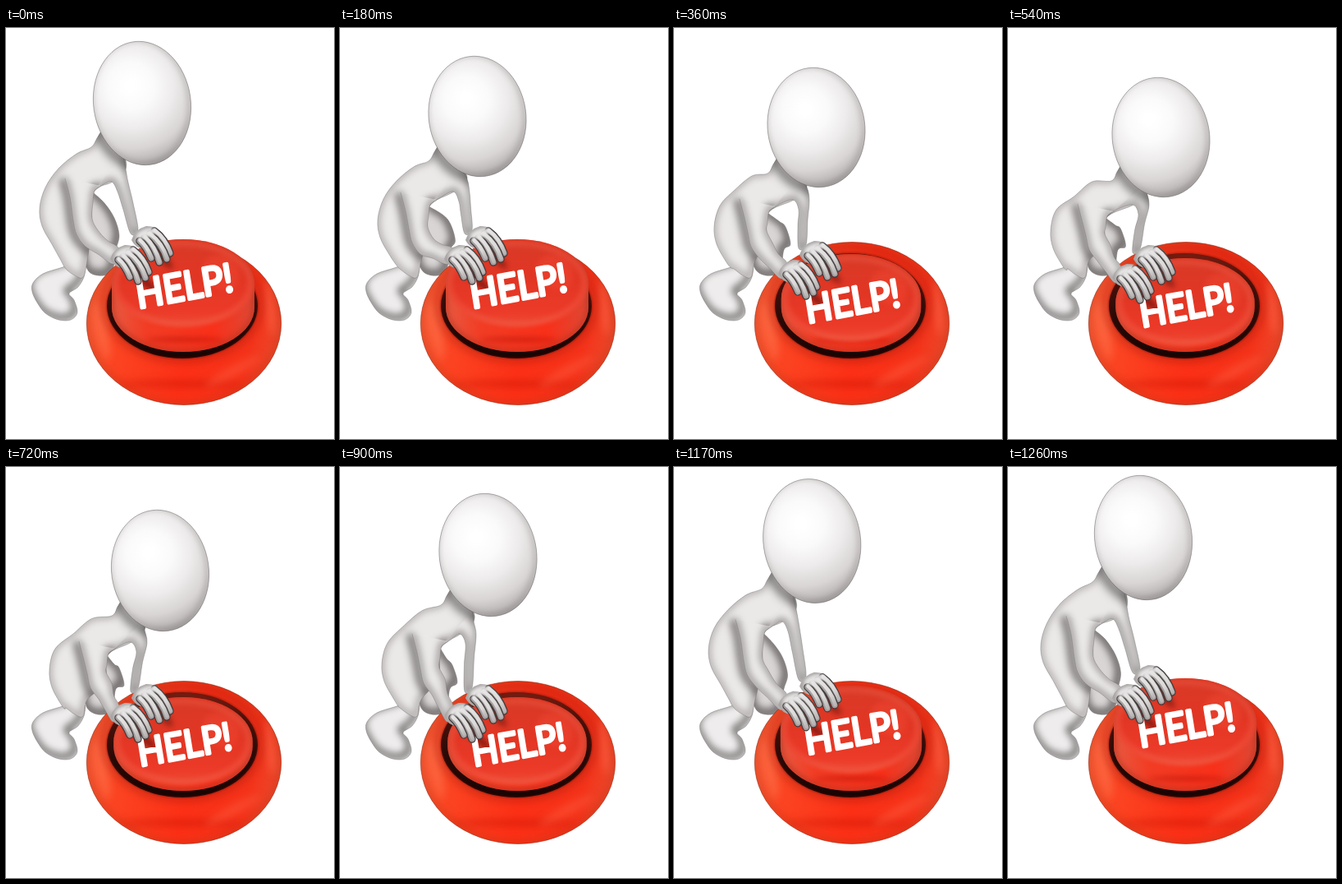
An HTML page with a canvas for the animation above (1410 ms loop, 400 by 500 pixels).

```html
<!DOCTYPE html>
<html lang="en">
<head>
<meta charset="utf-8">
<title>Help button</title>
<style>
  html, body { margin: 0; width: 100%; height: 100%; overflow: hidden; background: #fff; }
  canvas { display: block; width: 400px; height: 500px; }
</style>
</head>
<body>
<canvas id="stage" width="400" height="500"></canvas>
<script>
const ctx = document.getElementById('stage').getContext('2d');
const LOOP = 1410, STEP = 90, LAST = 14;

// One pose per 180 ms: head x, y, radius; offsets of neck, hip, armpit, far elbow; press depth
const POSES = [
  [166, 91.5, 75.5, 0, 0, 0, 0, 0, 0, 0, 0, 0],
  [167.5, 107.5, 73.5, 4, 17, 5, 14, 2, 17, 9, 12, 0],
  [173.5, 121, 73, 10, 32, 8, 22, 8, 25, 16, 22, 18],
  [186.5, 133, 73, 22, 41, 11, 27, 13, 31, 23, 28, 23],
  [188, 126, 74, 25, 36, 12, 27, 17, 29, 23, 26, 23],
  [180.5, 107, 75, 19, 23, 10, 20, 16, 20, 17, 16, 23],
  [172.5, 95.5, 75.5, 8, 13, 4, 8, 8, 8, 8, 5, 18],
  [165, 86, 76, -1, -5, -1, -3, -1, -2, -1, -2, 0]
];

// Outline points: x, y, joint that carries the point
const FAR_LEG = [[106, 200, 'a'], [120, 213, 'h'], [132, 231, 'l'], [138, 252, 'l'], [134, 270, 'o'],
  [129, 296, 'o'], [112, 301, 'o'], [98, 291, 'o'], [92, 250, 'l']];
const SHIN = [[82, 287, 'o'], [66, 292, 'o'], [45, 299, 'o'], [33, 310, 'o'], [32, 321, 'o'], [38, 334, 'o'],
  [48, 347, 'o'], [64, 355, 'o'], [79, 355, 'o'], [87, 346, 'o'], [83, 331, 'o'], [77, 323, 'o'],
  [88, 315, 'o'], [95, 303, 'o'], [97, 290, 'o']];
const TORSO = [[118, 122, 'n'], [111, 134, 'n'], [104, 145, 'n'], [86, 153, 's'], [64, 171, 's'], [48, 194, 'h'],
  [41, 219, 'h'], [44, 241, 'h'], [56, 263, 'h'], [66, 281, 'l'], [73, 293, 'o'], [84, 301, 'o'],
  [94, 303, 'o'], [99, 283, 'o'], [104, 245, 'e'], [107, 200, 'a'], [130, 187, 'b'], [146, 172, 'b'],
  [142, 148, 'n'], [126, 118, 'n']];
const FAR_ARM = [[108, 198, 'a'], [119, 190, 'a'], [129, 187, 'b'], [136, 199, 'b'], [143, 221, 'f'],
  [152, 250, 'p'], [161, 246, 'p'], [155, 213, 'f'], [149, 188, 'b'], [146, 172, 'b'], [142, 152, 'n']];
const ARM = [[72, 183, 'a'], [78, 206, 'a'], [82, 234, 'e'], [86, 251, 'e'], [96, 265, 'e'], [112, 275, 'q'],
  [131, 287, 'p'], [138, 269, 'p'], [123, 258, 'q'], [112, 246, 'e'], [105, 232, 'e'], [106, 212, 'a'],
  [108, 198, 'a'], [116, 192, 'a']];

function pose(i) {
  const k = i >> 1;
  if (i % 2 === 0) return POSES[k];
  const row = n => POSES[Math.max(0, Math.min(POSES.length - 1, n))];
  return row(k).map((v, j) =>
    (9 * (v + row(k + 1)[j]) - row(k - 1)[j] - row(k + 2)[j]) / 16);
}

function joints(v) {
  const mid = (a, b) => [(a[0] + b[0]) / 2, (a[1] + b[1]) / 2];
  const o = [0, 0], n = [v[3], v[4]], h = [v[5], v[6]], a = [v[7], v[8]], b = [v[9], v[10]];
  const p = [0, Math.max(0, v[11])], e = [a[0], a[1] * .6];
  return { o, n, h, a, b, p, e, s: mid(n, h), l: mid(o, h), f: mid(b, p), q: mid(e, p) };
}

// Smooth open curve through the points
function curve(points, J) {
  const pts = points.map(([x, y, j]) => [x + J[j][0], y + J[j][1]]);
  const at = i => pts[Math.max(0, Math.min(pts.length - 1, i))];
  const path = new Path2D();
  path.moveTo(...pts[0]);
  for (let i = 0; i < pts.length - 1; i++) {
    const [a, b, c, d] = [at(i - 1), at(i), at(i + 1), at(i + 2)];
    path.bezierCurveTo(b[0] + (c[0] - a[0]) / 6, b[1] + (c[1] - a[1]) / 6,
      c[0] - (d[0] - b[0]) / 6, c[1] - (d[1] - b[1]) / 6, c[0], c[1]);
  }
  return path;
}

function oval(x, y, rx, ry, turn = 0) {
  const path = new Path2D();
  path.ellipse(x, y, rx, ry, turn, 0, 7);
  return path;
}

function fill(path, color) {
  ctx.fillStyle = color;
  ctx.fill(path);
}

function stroke(path, color, width) {
  ctx.strokeStyle = color;
  ctx.lineWidth = width;
  ctx.stroke(path);
}

// Blurred paint kept inside a clip path
function soft(clip, blur, paint) {
  ctx.save();
  if (clip) ctx.clip(clip);
  ctx.filter = `blur(${blur}px)`;
  paint();
  ctx.restore();
}

function blend(make, stops) {
  stops.forEach(([at, color]) => make.addColorStop(at, color));
  return make;
}

function limb(path, tone, shade, dx, dy, width = 8) {
  fill(path, tone);
  soft(path, 4, () => {
    ctx.translate(dx, dy);
    stroke(path, shade, width);
  });
  stroke(path, 'rgba(95,90,90,.5)', .7);
}

function drawBase() {
  const base = oval(217, 359.5, 118.7, 99);
  fill(base, blend(ctx.createLinearGradient(98, 330, 336, 380),
    [[0, '#f8603a'], [.2, '#fb4422'], [.55, '#fc3016'], [.85, '#f4331a'], [1, '#ea4a2c']]));
  soft(base, 5, () => {
    ctx.translate(0, -1);
    stroke(base, 'rgba(190,50,20,.5)', 6);
  });
  soft(base, 5, () => {
    fill(oval(212, 433, 76, 4), 'rgba(200,18,4,.5)');
    fill(oval(276, 418, 38, 6, -.5), 'rgba(255,100,70,.4)');
    fill(oval(117, 368, 7, 36, -.2), 'rgba(255,125,85,.4)');
    fill(oval(322, 340, 5, 34, -.1), 'rgba(255,110,80,.5)');
    stroke(oval(215, 336, 96, 68), 'rgba(150,18,8,.4)', 7);
  });
  stroke(base, 'rgba(120,30,10,.6)', .8);
  const hole = oval(215, 338, 92, 64);
  fill(hole, blend(ctx.createLinearGradient(0, 272, 0, 402),
    [[0, '#7a1e12'], [.25, '#4c120b'], [.6, '#2a0a07'], [1, '#180403']]));
  soft(null, 1, () => stroke(hole, 'rgba(110,16,8,.7)', 1.5));
}

function drawCap(press) {
  const rx = 87 - press / 10, y = 311 + press, x = 216;
  const cap = new Path2D();
  cap.ellipse(x, y, rx, 54, 0, Math.PI, 0);
  cap.ellipse(x, Math.max(340, y + 5), rx, 54, 0, 0, Math.PI);
  cap.closePath();
  fill(cap, blend(ctx.createLinearGradient(128, 0, 305, 0),
    [[0, '#e85a42'], [.25, '#f23c24'], [.7, '#f8301a'], [1, '#dc4a36']]));
  soft(cap, 3, () => {
    stroke(cap, 'rgba(185,50,32,.65)', 7);
    if (press < 20) fill(oval(218, 379, 46, 3), 'rgba(175,14,4,.5)');
  });
  const face = oval(x, y, rx - 2, 52);
  soft(cap, 2, () => fill(face, blend(ctx.createLinearGradient(0, y - 54, 0, y + 54),
    [[0, '#d93a28'], [.45, '#e23624'], [.8, '#ec3a28'], [1, '#ee4c36']])));
  soft(cap, 3, () => {
    stroke(oval(x, y, rx - 5, 49), 'rgba(245,115,90,.4)', 5);
    fill(oval(262, y - 14, 24, 20, .6), 'rgba(255,85,60,.25)');
    fill(oval(170, y - 2, 18, 5, .7), 'rgba(75,8,4,.55)');
    fill(oval(192, y - 30, 16, 5, .8), 'rgba(75,8,4,.45)');
  });

  const k = 1 - press / 23 * .03;
  ctx.save();
  ctx.transform(.92 * k, -.17 * k, .16, k, 163 + press / 12, 341 + press);
  ctx.font = '47px Lato, "Open Sans", sans-serif';
  ctx.lineJoin = ctx.lineCap = 'round';
  ctx.fillStyle = ctx.strokeStyle = '#fff';
  ctx.lineWidth = 3.8;
  ctx.fillText('HELP!', -2, 0);
  ctx.strokeText('HELP!', -2, 0);
  ctx.restore();
}

function drawHand(dx, dy) {
  ctx.save();
  ctx.translate(dx, dy);
  ctx.lineCap = 'round';
  const palm = new Path2D('M127 281Q131 268 145 264Q160 264 168 277L162 291L142 292Q132 291 127 281Z');
  fill(palm, '#d3d0cf');
  soft(palm, 3, () => stroke(palm, 'rgba(60,55,55,.55)', 4));
  const tips = [[174, 297], [170, 304], [161, 308], [151, 303]];
  tips.forEach(([x, y], i) => {
    const bx = 155 - i * 6, by = 270 + i * 4;
    const finger = new Path2D(`M${bx} ${by}Q${x - 6} ${(by + y) / 2 - 4} ${x} ${y}`);
    stroke(finger, '#3f3a3a', 9.4);
    stroke(finger, '#a5a0a0', 7);
    ctx.save();
    ctx.translate(.5, -.8);
    stroke(finger, blend(ctx.createLinearGradient(bx, by, x, y),
      [[0, '#e6e4e4'], [.6, '#dddada'], [1, '#bab6b6']]), 4.4);
    ctx.restore();
  });
  soft(null, 2, () => fill(oval(145, 273, 12, 5, -.3), '#e6e4e4'));
  ctx.restore();
}

function drawHead(head, x, y, r) {
  fill(head, blend(ctx.createRadialGradient(x - 14, y - 22, 6, x - 12, y - 18, r * 1.28),
    [[0, '#ffffff'], [.25, '#fbfafa'], [.5, '#edebeb'], [.75, '#d8d5d4'], [.9, '#bfbbba'], [1, '#a39f9e']]));
  soft(head, 3, () => {
    ctx.translate(-2, -2);
    stroke(head, 'rgba(120,115,115,.4)', 4);
  });
  stroke(head, 'rgba(80,75,75,.55)', .8);
}

function draw(i) {
  const v = pose(i), J = joints(v), press = J.p[1];
  const [torso, arm, farArm] = [TORSO, ARM, FAR_ARM].map(p => curve(p, J));
  const head = oval(v[0], v[1], 59.3, v[2], -.14);
  const body = new Path2D(torso);
  body.addPath(farArm);

  ctx.fillStyle = '#fff';
  ctx.fillRect(0, 0, 400, 500);

  limb(curve(FAR_LEG, J), '#d8d5d4', 'rgba(60,55,55,.65)', -2, -2, 11);
  limb(curve(SHIN, J), '#eeecec', 'rgba(75,70,70,.7)', -3, -4);
  limb(torso, '#ebe9e8', 'rgba(95,90,90,.42)', -1, -1);
  soft(torso, 5, () => {
    ctx.translate(-3, 0);
    stroke(arm, 'rgba(65,60,60,.65)', 10);
  });
  drawBase();
  drawCap(press);
  limb(farArm, '#ebe9e8', 'rgba(70,65,65,.6)', 1, -1, 6);
  limb(arm, '#ebe9e8', 'rgba(80,75,75,.55)', 0, -1, 7);
  soft(body, 6, () => {
    ctx.translate(-1, 3);
    stroke(head, 'rgba(50,46,46,.65)', 11);
  });
  drawHand(26, press - 23);
  drawHand(0, press);
  drawHead(head, v[0], v[1], v[2]);
}

let shown = -1;
function tick(now) {
  const i = Math.min(LAST, Math.floor(now % LOOP / STEP));
  if (i !== shown) draw(shown = i);
  requestAnimationFrame(tick);
}
tick(performance.now());
</script>
</body>
</html>
```
